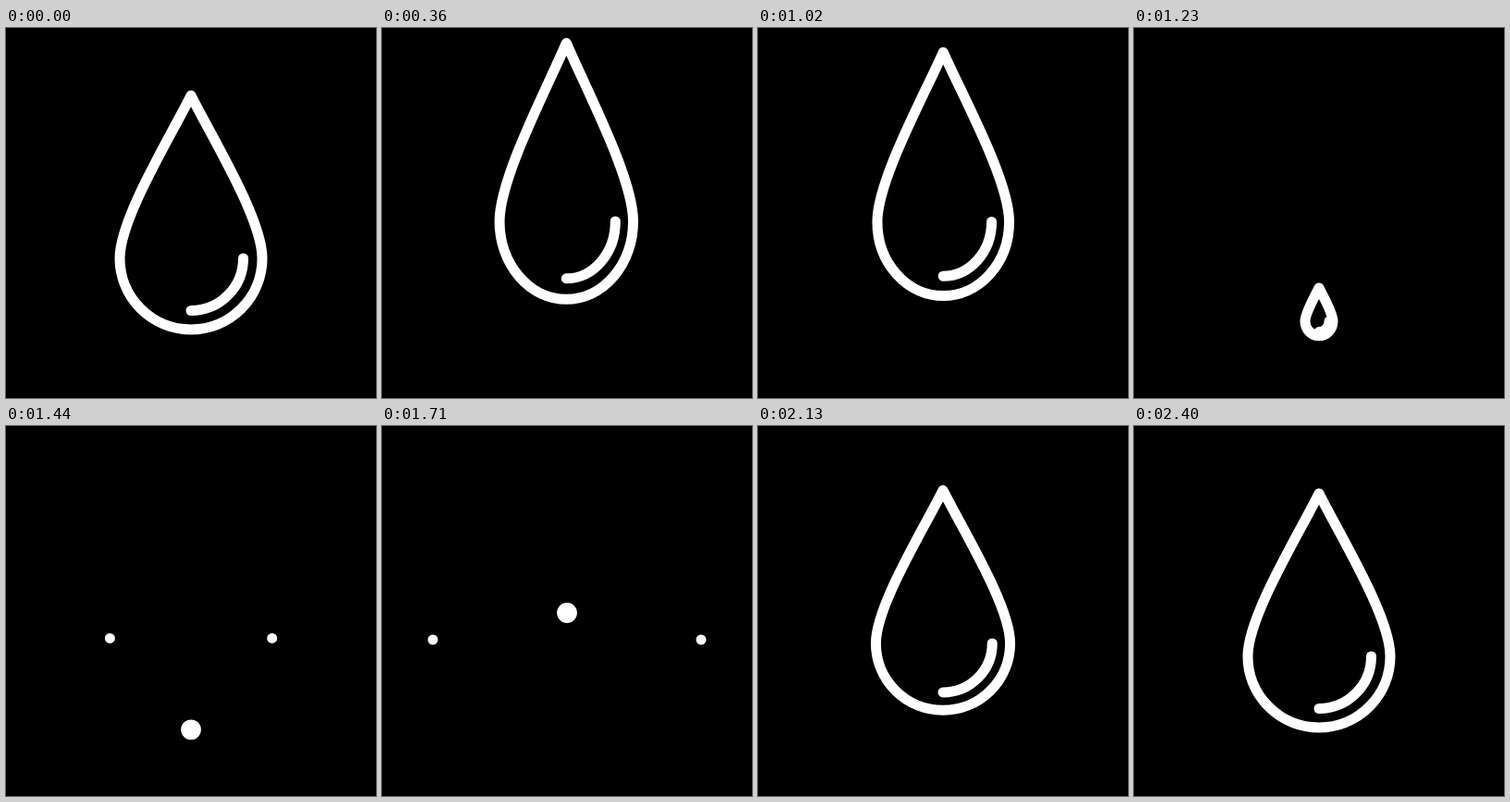
Recreate the animation shown at these times as an HTML page with a canvas. Size 400 by 400 pixels, loop 2.46 s.

```html
<!DOCTYPE html>
<html lang="en">
<head>
<meta charset="utf-8">
<title>Bouncing drop</title>
<style>
  html, body { margin: 0; width: 100%; height: 100%; overflow: hidden; background: #000; }
  canvas { display: block; width: 400px; height: 400px; }
</style>
</head>
<body>
<canvas id="stage" width="400" height="400"></canvas>
<script>
const ctx = document.getElementById('stage').getContext('2d');
const LOOP = 2460, STEP = 30;
const clamp = v => Math.min(1, Math.max(0, v));

// Smooth track through [time, value] keys that never overshoots them
function track(...keys) {
  const slope = i => (keys[i + 1][1] - keys[i][1]) / (keys[i + 1][0] - keys[i][0]);
  const tangents = keys.map((_, i) => {
    if (i === 0 || i === keys.length - 1) return 0;
    const a = slope(i - 1), b = slope(i);
    return a * b > 0 ? 2 * a * b / (a + b) : 0;
  });
  return t => {
    let i = 0;
    while (i < keys.length - 2 && t >= keys[i + 1][0]) i++;
    const [t0, v0] = keys[i], [t1, v1] = keys[i + 1];
    const d = t1 - t0, u = clamp((t - t0) / d), w = 1 - u;
    return v0 * w * w * (1 + 2 * u) + v1 * u * u * (3 - 2 * u)
      + d * u * w * (w * tangents[i] - u * tangents[i + 1]);
  };
}

const bodyY = track([0, 249], [360, 209], [540, 203], [720, 202], [860, 201], [960, 204],
  [1080, 220], [1230, 317], [1290, 331], [1500, 326], [1620, 296], [1710, 202],
  [1810, 97], [1950, 194], [2160, 238], [2370, 249], [LOOP, 249]);
const scaleY = track([0, 1], [360, 1.095], [540, 1.1], [860, 1.105], [960, 1.08], [1080, .966],
  [1230, .205], [1290, .07], [1710, .07], [1810, .46], [1950, .767], [2160, .953], [2370, 1], [LOOP, 1]);
const scaleX = track([0, 1], [360, .938], [540, .93], [960, .928], [1080, .92],
  [1230, .195], [1290, .07], [1710, .07], [1810, .45], [1950, .78], [2160, .955], [2370, 1], [LOOP, 1]);

function drop(x, y, sx, sy) {
  const tip = clamp((sy - .07) / .13); // 0 is a circle, 1 a full drop
  const top = -77 - 99 * tip, cx = 42.5 - 18.5 * tip, cy = -77 - 51 * tip;
  ctx.save();
  ctx.translate(x, y);
  ctx.scale(sx, sy);
  ctx.beginPath();
  ctx.moveTo(0, top);
  ctx.bezierCurveTo(cx, cy, 77, -42.5, 77, 0);
  ctx.arc(0, 0, 77, 0, Math.PI);
  ctx.bezierCurveTo(-77, -42.5, -cx, cy, 0, top);
  ctx.closePath();
  ctx.moveTo(56.5, 0);
  ctx.arc(0, 0, 56.5, 0, Math.PI / 2);
  ctx.restore();
  ctx.stroke(); // unscaled, so the line keeps its weight
}

function splash(t) {
  if (t < 1290 || t >= 1740) return;
  const e = 1 - (1 - clamp((t - 1290) / 420)) ** 2.1, w = 1 - e;
  const y = 331 * w * w + 390 * e * w + 231 * e * e;
  for (const side of [-1, 1]) {
    ctx.beginPath();
    ctx.arc(200 + side * 145 * e, y, 5.5, 0, 2 * Math.PI);
    ctx.fill();
  }
}

function tremble(t) {
  const fade = clamp((t - 60) / 200) * clamp((1080 - t) / 150);
  return -.7 * fade * Math.cos(2 * Math.PI * (t - 360) / 144);
}

function render(t) {
  ctx.fillStyle = '#000';
  ctx.fillRect(0, 0, 400, 400);
  ctx.fillStyle = ctx.strokeStyle = '#fff';
  ctx.lineWidth = 11;
  ctx.lineCap = ctx.lineJoin = 'round';
  splash(t);
  drop(200 + tremble(t), bodyY(t), scaleX(t), scaleY(t));
}

const start = performance.now();
function tick() {
  const t = (performance.now() - start) % LOOP;
  render(Math.floor(t / STEP) * STEP);
  requestAnimationFrame(tick);
}
tick();
</script>
</body>
</html>
```
